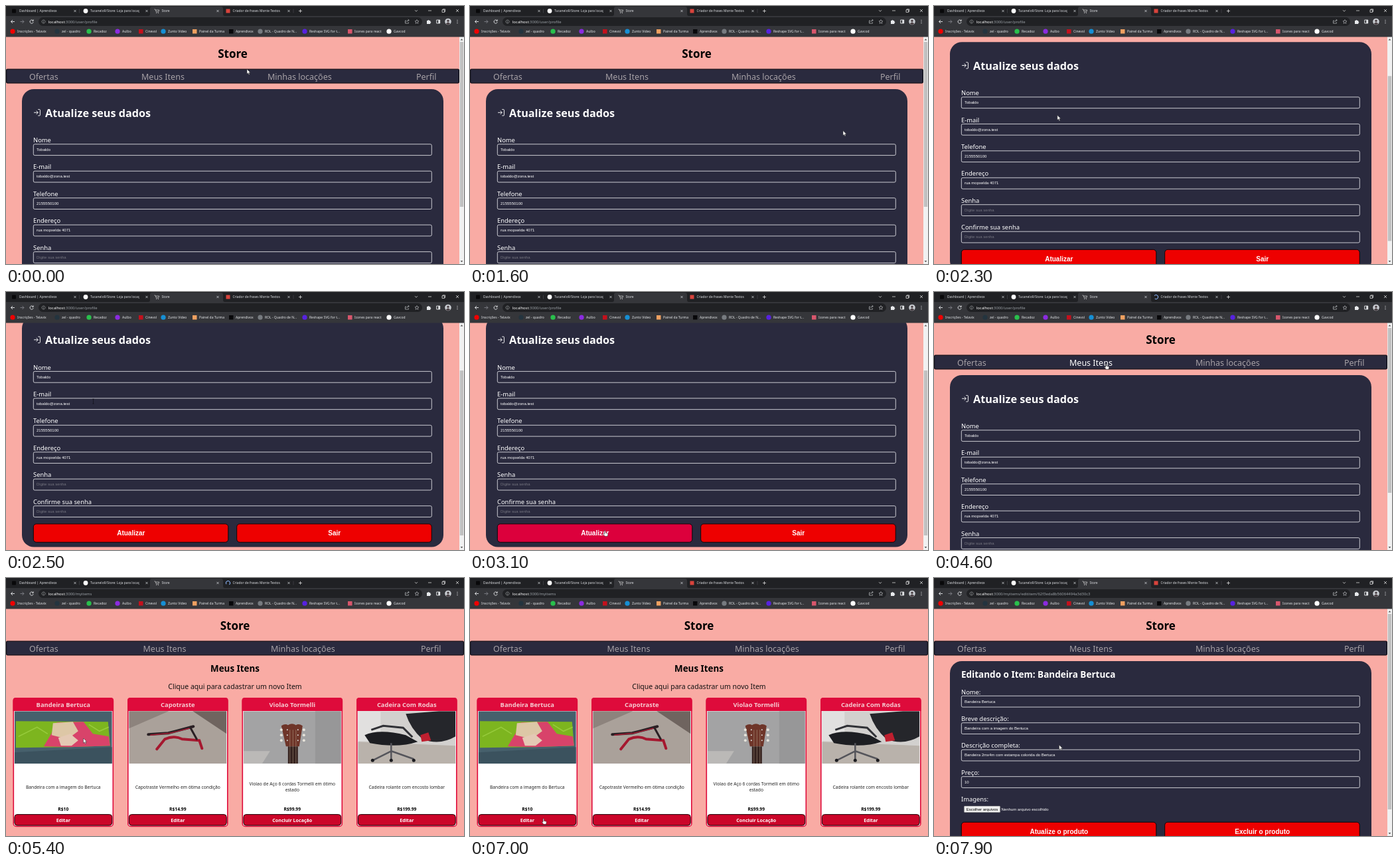
Recreate the animation shown at these times as an HTML page. Size 690 by 388 pixels, loop 8000 ms.

```html
<!DOCTYPE html>
<html lang="pt-BR">
<head>
<meta charset="utf-8">
<title>Store</title>
<style>
  html, body { margin: 0; width: 100%; height: 100%; overflow: hidden; background: #f9aba4; }
  svg { display: block; width: 690px; height: 388px; font-family: "Noto Sans", "Open Sans", sans-serif; }
  text { white-space: pre; }
  .arial { font-family: "Liberation Sans", Arial, sans-serif; }
</style>
</head>
<body>
<svg id="stage" viewBox="0 0 690 388"></svg>
<script>
const NAVY = '#2a2a3e', PINK = '#f9aba4', RED = '#ee0000', CRIMSON = '#de0b3b', BAR = '#35363a', DARK = '#202124';

// Markup helpers
const rect = (x, y, w, h, fill, more = '') => `<rect x="${x}" y="${y}" width="${w}" height="${h}" fill="${fill}" ${more}/>`;
const dot = (x, y, r, fill) => `<circle cx="${x}" cy="${y}" r="${r}" fill="${fill}"/>`;
const path = (d, fill, more = '') => `<path d="${d}" fill="${fill}" ${more}/>`;
const line = (d, color, width = .8, more = '') => path(d, 'none', `stroke="${color}" stroke-width="${width}" ${more}`);
const text = (x, y, size, str, fill = '#fff', more = '') => `<text x="${x}" y="${y}" font-size="${size}" fill="${fill}" ${more}>${str}</text>`;
const MID = 'text-anchor="middle"', BOLD = 'font-weight="700"', ARIAL = 'class="arial"', ROUND = 'stroke-linecap="round"';
const cross = (x, y, r, color) => line(`M${x - r} ${y - r}l${2 * r} ${2 * r}m0 ${-2 * r}l${-2 * r} ${2 * r}`, color, .7);

function browser() {
  const tabText = (x, str) => text(x, 9.4, 4.9, str, '#dfe1e5');
  const tabs = rect(0, 0, 690, 15, DARK) +
    path('M214 15q3 0 3-3V4q0-3 3-3h104q3 0 3 3v8q0 3 3 3z', BAR) +
    rect(9, 4.5, 6, 6, '#08080a', 'rx="1"') + tabText(20, 'Dashboard | Aprendivox') +
    dot(120, 7.5, 3.4, '#fff') + tabText(127, 'Tucanelo9/Store: Loja para locaç') +
    line('M223.5 5h1.4l1.4 3.8h3.4l1-2.7h-4.9', '#ddd', .7) + dot(226.7, 10.3, .6, '#ddd') + dot(229.5, 10.3, .6, '#ddd') +
    tabText(234.5, 'Store') + tabText(341.5, 'Criador de frases Monte Textos') +
    rect(331.5, 4.5, 6, 6, '#d8433c', 'id="favicon"') +
    line('M337.5 7.5a3 3 0 1 1-3-3', '#8ab4f8', 1, 'id="spinner"') +
    [104, 212, 319, 426].map(x => cross(x, 7.5, 1.6, '#dfe1e5')).join('') +
    line('M110.5 4.5v6M433 4.5v6', '#55575c', .5) +
    line('M441 7.5h5M443.5 5v5M616 6.2l2 2 2-2M636 7h5M657 5.8h3.6v3.6H657zM658 5.8v-1h3.6v3.6h-1', '#eee', .7) +
    cross(680, 7, 2, '#eee');

  const tools = rect(0, 15, 690, 31.5, BAR) + rect(49, 17, 578, 13, DARK, 'rx="6.5"') +
    line('M13 23.5H7.5M10 21l-2.5 2.5L10 26', '#e8eaed', .9) +
    line('M21.5 23.5H27M24.5 21l2.5 2.5-2.5 2.5', '#808288', .9) +
    line('M40.6 21.8a2.6 2.6 0 1 0 .6 2.4M41.2 20.4v2h-2', '#e8eaed', .9) +
    line('M56.5 21a2.5 2.5 0 1 0 .1 0M56.5 23.2v1.6M56.5 21.9v.5', '#b8babd', .6) +
    '<text id="url" x="63.8" y="25.8" font-size="5.85" fill="#9aa0a6"><tspan fill="#fff">localhost</tspan><tspan id="route"></tspan></text>' +
    line('M603 22h-1.5v4h5v-1.5M603.5 24q.5-2.6 3.5-2.6M605.7 20l1.6 1.4-1.6 1.4', '#c4c7cb', .7) +
    line('M619 20.5l.9 2 2.1.2-1.6 1.4.5 2.2-1.9-1.2-1.9 1.2.5-2.2-1.6-1.4 2.1-.2z', '#c4c7cb', .6) +
    path('M634 22h1.4a1.1 1.1 0 0 1 2.2 0h1.6v1.5a1.1 1.1 0 0 1 0 2.2v1.3H634z', '#e8eaed') +
    line('M648.7 21h5v5h-5z', '#e8eaed', .9) + rect(651.3, 21, 2.4, 5, '#e8eaed') +
    dot(666, 23.5, 4.8, '#c9cdd2') + dot(666, 22.2, 1.7, '#4b4145') + path('M662.7 26.8q3.3-4.4 6.6 0-3.3 2.5-6.6 0z', '#4b4145') +
    [21.3, 23.5, 25.7].map(y => dot(680, y, .6, '#e8eaed')).join('');

  const bookmarks = [
    [17, 'Inscrições - Telavix', '#f00000'], [84, 'zel - quadro', '#24343f'], [132, 'Recadoz', '#29c04c'],
    [175, 'Aulbo', '#8b2be0'], [210, 'Cinevol', '#c4101c', 1], [244, 'Zunto Video', '#168fd4'],
    [291, 'Painel da Turma', '#f0a060', 1], [346, 'Aprendivox', '#08080a', 1], [390, 'ROL - Quadro de N...', '#777b80'],
    [457, 'Reshape SVG for t...', '#5722e0'], [525, 'Icones para react', '#d8566c', 1], [584, 'Gavcod', '#fff']
  ].map(([x, name, color, square]) => (square ? rect(x - 10, 35, 6.5, 6.5, color) : dot(x - 7, 38.2, 3.6, color)) +
    text(x, 40, 5, name, '#e4e6e9')).join('');
  return tabs + tools + bookmarks;
}

function header(width, xs) {
  const names = ['Ofertas', 'Meus Itens', 'Minhas locações', 'Perfil'];
  return text(width / 2, 78, 17, 'Store', '#000', `${BOLD} ${MID}`) +
    rect(.6, 95.2, width - 1.2, 20.6, NAVY, 'stroke="#0b0b14" stroke-width="1.2" rx="1.5"') +
    names.map((name, i) => text(xs[i], 110.8, 12.5, name, '#a7a1a6', 'data-nav')).join('');
}

const field = (y, label, value, color = '#fff') => text(41, y, 9.4, label) +
  rect(41.3, y + 2.8, 600, 16.8, 'none', 'stroke="#f2f2f5" stroke-width=".8" rx="2"') +
  text(46, y + 13, 6, value, color, ARIAL);

const bigButton = (x, y, label, id = '') => rect(x, y, 293.5, 27.5, RED, `stroke="#100508" rx="4.5" ${id}`) +
  text(x + 147, y + 17.4, 10, label, '#fff', `${ARIAL} ${BOLD} ${MID}`);

function scrollbar(height, id = '') {
  return rect(683, 46, 7, 342, '#f1f1f1') + rect(683.8, 54, 5.4, height, '#c1c1c1', id) +
    path('M684.6 51.4l1.9-2.2 1.9 2.2z', '#555') + path('M684.6 383l1.9 2.2 1.9-2.2z', '#555');
}

const NAV_NARROW = [35, 204, 394, 618], NAV_WIDE = [35, 206.5, 399, 625];

function profilePage() {
  const hint = '#74747f';
  const fields = [['Nome', 'Tobaldo'], ['E-mail', 'tobaldo@zona.test'], ['Telefone', '2155550100'],
    ['Endereço', 'rua mopxelda 4071'], ['Senha', 'Digite sua senha', hint], ['Confirme sua senha', 'Digite sua senha', hint]];
  return '<g id="scroller">' + header(683, NAV_NARROW) + rect(24, 125, 635, 347, NAVY, 'rx="18"') +
    line('M15 3h4a2 2 0 0 1 2 2v14a2 2 0 0 1-2 2h-4M10 17l5-5-5-5M15 12H3', '#fff', 1.8, 'transform="translate(40.5 154)scale(.52)"') +
    text(59, 166.8, 16.2, 'Atualize seus dados', '#fff', BOLD) +
    fields.map(([label, value, color], i) => field(205 + i * 40.45, label, value, color)).join('') +
    bigButton(41.3, 437.2, 'Atualizar', 'id="update"') + bigButton(347.7, 437.2, 'Sair') + '</g>' + scrollbar(248, 'id="thumb"');
}

// Simplified product pictures, each 147 x 79
const photos = [
  rect(0, 0, 147, 79, '#46606c') + path('M0 62l147-8v25H0z', '#3b525e') +
    path('M2 15l139 1 3 36-60 2-82 1z', '#7db51f') + path('M44 53l12-20 8-16 40-1 14 18 24 4 2 14-60 2z', '#d8436a') +
    path('M58 18l30-2 8 14-16 12-24-6z', '#ddc7a6') + path('M66 40l18-6 12 10-10 8H70z', '#e4c9b4') +
    line('M6 38l28-14 16 10M112 20l16 10 14-6', '#98cc3c', 1.5),
  rect(0, 0, 147, 79, '#aaa19a') + path('M96 0h51v34z', '#6f645f') + path('M0 0h60L0 26z', '#8d837d') +
    line('M29 35l30-2 38-10', '#2a2024', 4, ROUND) + line('M32 36l30-3 32-8', '#a81c34', 1.4) +
    line('M42 57l12-15q14-6 26 0l26 2 4 12', '#a5182f', 4, ROUND) + line('M92 24l10 18', '#2a2024', 3, ROUND),
  rect(0, 0, 147, 79, '#a3a3a4') + rect(108, 0, 39, 79, '#979798') + path('M0 60h40l-12 19H0z', '#bbb9b7') +
    path('M57 22q6-4 10-1 6-4 12 0 4-3 10 1l-5 31H64z', '#6e3529') + rect(67, 53, 15, 26, '#35221f') +
    line('M70 28v51M74.500 28v51M79 28v51', '#baa68c', .5) +
    [28, 36, 44].map(y => dot(57, y, 2, '#e6e3da') + dot(91, y, 2, '#e6e3da') + dot(66, y, 1, '#ddd') + dot(82, y, 1, '#ddd')).join(''),
  rect(0, 0, 147, 79, '#d2d0ce') + path('M0 46l147 6v27H0z', '#b9b2ab') + rect(0, 0, 34, 45, '#e1e0df') +
    path('M72 4l50-4h25v38q-24 14-50 4-18-16-25-38z', '#25262b') + path('M10 36q22-10 62 0l18 10q-30 10-72 2z', '#1d1e22') +
    path('M94 36l12-4 4 12-14 2z', '#bf1f2f') + line('M50 48v14M50 60L22 74M50 60l34 12M50 60v14', '#55555b', 2.5) +
    line('M20 28l18-6 30 3 14 14', '#303136', 3) + [22, 50, 84].map(x => dot(x, 74, 2.5, '#1b1b1f')).join('')
];

function itemsPage() {
  const items = [
    ['Bandeira Bertuca', ['Bandeira com a imagem do Bertuca'], 'R$10', 'Editar'],
    ['Capotraste', ['Capotraste Vermelho em ótima condição'], 'R$14.99', 'Editar'],
    ['Violao Tormelli', ['Violao de Aço 6 cordas Tormelli em ótimo', 'estado'], 'R$99.99', 'Concluir Locação'],
    ['Cadeira Com Rodas', ['Cadeira rolante com encosto lombar'], 'R$199.99', 'Editar']
  ];
  const card = ([name, about, price, action], i) => `<g transform="translate(${10.5 + i * 172.5} 180)">` +
    rect(.8, .8, 150, 192.6, '#fff', `stroke="${CRIMSON}" stroke-width="1.6" rx="4"`) +
    path('M0 20V4q0-4 4-4h143.600q4 0 4 4v16z', CRIMSON) +
    text(75.8, 14.2, 9.4, name, '#f6ccd2', `${BOLD} ${MID}`) +
    `<svg x="2.300" y="20.300" width="147" height="79">${photos[i]}</svg>` +
    about.map((row, n) => text(75.8, (about.length > 1 ? 132 : 136.5) + n * 9.3, 6.7, row, '#222', MID)).join('') +
    text(75.8, 170.2, 6.7, price, '#000', `${BOLD} ${MID}`) +
    rect(2.4, 175.6, 146.8, 16.4, '#cb0629', 'stroke="#1d0508" rx="4"') +
    text(75.8, 186.5, 7.1, action, '#fff', `${BOLD} ${MID}`) + '</g>';
  return header(690, NAV_WIDE) + text(345, 140.8, 13.4, 'Meus Itens', '#000', `${BOLD} ${MID}`) +
    text(345, 167, 10.5, 'Clique aqui para cadastrar um novo Item', '#111', MID) + items.map(card).join('');
}

function editPage() {
  const fields = [['Nome:', 'Bandeira Bertuca'], ['Breve descrição:', 'Bandeira com a imagem do Bertuca'],
    ['Descrição completa:', 'Bandeira 2mx4m com estampa colorida do Bertuca'], ['Preço:', '10']];
  return header(683, NAV_NARROW) + rect(24, 125, 635, 300, NAVY, 'rx="18"') +
    text(41, 150, 13.5, 'Editando o Item: Bandeira Bertuca', '#fff', BOLD) +
    fields.map(([label, value], i) => field(174.500 + i * 40.45, label, value)).join('') +
    text(41, 336, 9.4, 'Imagens:') + rect(45.3, 343, 54.4, 9.5, '#efefef', 'stroke="#777" stroke-width=".5" rx="1"') +
    text(72.5, 349.9, 6, 'Escolher arquivos', '#000', `${ARIAL} ${MID}`) + text(101.5, 349.9, 6, 'Nenhum arquivo escolhido', '#fff', ARIAL) +
    bigButton(41.3, 367.2, 'Atualize o produto') + bigButton(347.7, 367.2, 'Excluir o produto') + scrollbar(294);
}

const pointers = {
  arrow: path('M0 0v7.200l1.700-1.500 1.200 2.600 1.200-.5-1.200-2.600h2.300z', '#fff', 'stroke="#222" stroke-width=".5"'),
  hand: path('M0 0q1-.8 1.400.4v2.800l3 .8q1 .4.8 1.600l-.6 2.700H.8L-1.800 5q.2-1.200 1.800.2z', '#fff', 'stroke="#222" stroke-width=".5"'),
  beam: line('M-1.200 0h2.400M0 0v7M-1.200 7h2.400', '#0c0c14', .6)
};

const $ = id => document.getElementById(id);
const pages = { profile: profilePage, items: itemsPage, edit: editPage };
$('stage').innerHTML = rect(0, 0, 690, 388, PINK) +
  Object.entries(pages).map(([id, draw]) => `<g id="${id}">${draw()}</g>`).join('') + browser() +
  '<g id="cursor">' + Object.entries(pointers).map(([id, art]) => `<g id="${id}">${art}</g>`).join('') + '</g>';

// [time, x, y, pointer]
const cursorKeys = [
  [0, 363, 95, 'arrow'], [400, 559, 155.5, 'arrow'], [500, 559, 155.5, 'arrow'], [800, 571, 156, 'arrow'],
  [1200, 571, 156, 'arrow'], [1300, 571, 186, 'arrow'], [1500, 571, 186, 'arrow'], [1600, 562, 187.5, 'arrow'],
  [2500, 131.5, 161, 'beam'], [2600, 131.5, 161, 'arrow'], [3000, 200, 360, 'hand'], [3200, 205, 358, 'arrow'],
  [3500, 264, 282, 'arrow'], [4400, 258.5, 108, 'hand'], [4800, 258.5, 108, 'arrow'],
  [5400, 116.5, 241, 'arrow'], [5600, 114, 296.5, 'arrow'], [5800, 114, 296.5, 'arrow'], [6300, 185, 322, 'arrow'],
  [6700, 118, 346, 'arrow'], [6800, 110, 362, 'hand'], [7100, 110, 362, 'arrow'], [7900, 188.5, 251, 'arrow'], [8000, 188.5, 251, 'arrow']
];
const scrollKeys = [[0, 0], [1800, 0], [2500, 88.4], [3400, 88.4], [3500, 87.4], [4000, 0], [8000, 0]];

function sample(keys, t, col) {
  const i = keys.findIndex(k => k[0] > t), a = keys[i - 1], b = keys[i];
  const u = (t - a[0]) / (b[0] - a[0]);
  return typeof a[col] === 'string' ? a[col] : a[col] + (b[col] - a[col]) * u * u * (3 - 2 * u);
}

const routes = { profile: ':3000/user/profile', items: ':3000/myitems', edit: ':3000/myitems/edititem/62f3eda8b56064494a3d30c3' };
const show = (id, on) => $(id).style.display = on ? '' : 'none';
const navItems = [...document.querySelectorAll('[data-nav]')];

function render(now) {
  const t = Math.floor(now % 8000 / 100) * 100;
  const page = t < 4800 ? 'profile' : t < 7100 ? 'items' : 'edit';
  for (const id in pages) show(id, id === page);
  $('route').textContent = routes[page];

  const scroll = sample(scrollKeys, t, 1);
  $('scroller').setAttribute('transform', `translate(0 ${-scroll})`);
  $('thumb').setAttribute('y', 54 + scroll * .725);
  const glow = Math.max(0, Math.min(1, (t - 2900) / 200, (3550 - t) / 300));
  $('update').setAttribute('fill', `rgb(${238 - 18 * glow} 0 ${60 * glow})`);

  const x = sample(cursorKeys, t, 1), y = sample(cursorKeys, t, 2), kind = sample(cursorKeys, t, 3);
  $('cursor').setAttribute('transform', `translate(${x} ${y})`);
  for (const id in pointers) show(id, id === kind);
  for (const item of navItems) {
    const left = +item.getAttribute('x');
    const over = scroll < 5 && y > 98 && y < 114 && x > left && x < left + item.textContent.length * 6.5;
    item.setAttribute('fill', over ? '#fff' : '#a7a1a6');
  }

  const loading = t >= 4000 && t < 5500;
  show('favicon', !loading);
  show('spinner', loading);
  $('spinner').setAttribute('transform', `rotate(${t * .36} 334.5 7.5)`);
}

let start;
function tick(now) {
  start ??= now;
  render(now - start);
  requestAnimationFrame(tick);
}
requestAnimationFrame(tick);
</script>
</body>
</html>
```
